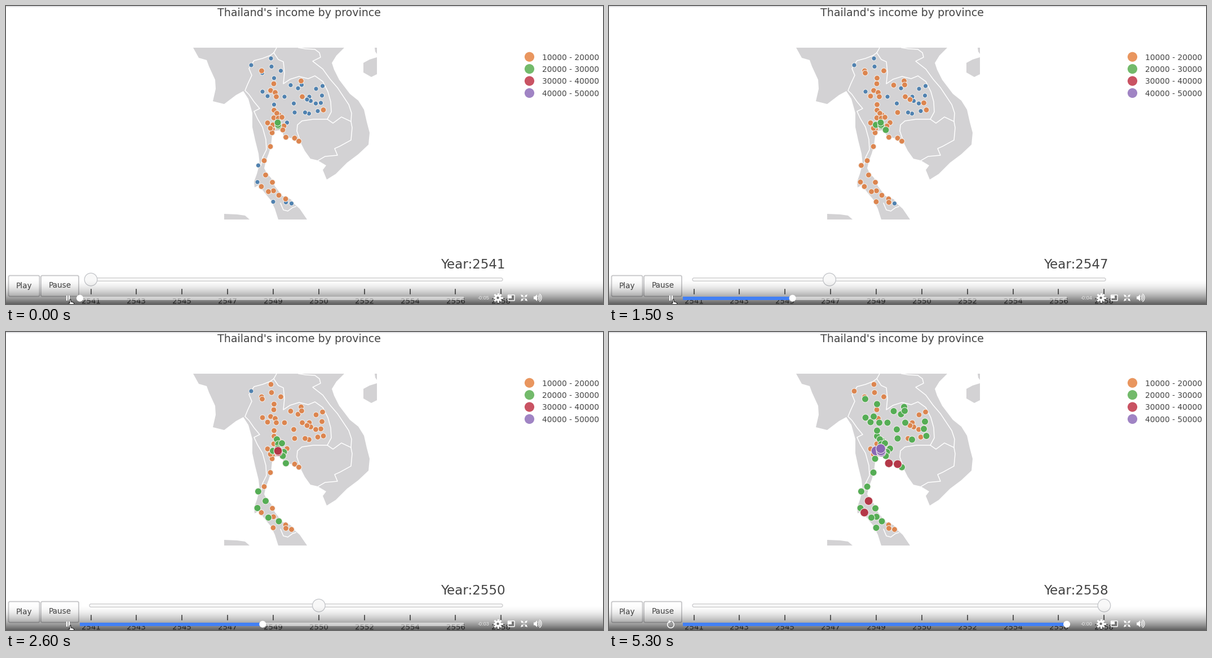
Animation of 1059x529 px, one loop 5.6 s. Source, as a matplotlib script:

```python
import numpy as np
import matplotlib.pyplot as plt
from matplotlib.animation import FuncAnimation
from matplotlib.patches import Circle, FancyBboxPatch, Polygon, Rectangle

W, H, DPI = 1059, 529, 100
STEP, LOOP = 100, 5600
PX = 72 / DPI  # points per pixel

YEARS = [2541, 2543, 2545, 2547, 2549, 2550, 2552, 2554, 2556, 2558]
LAND = "#d3d2d4"
INK = "#444444"

# income band: dot colour and radius
BANDS = {
    "b": ("#5082b0", 4.1),
    "o": ("#dc854f", 4.9),
    "g": ("#55ad55", 6.0),
    "r": ("#b43848", 7.4),
    "p": ("#8a68b4", 8.4),
}
LEGEND = [("10000 - 20000", "#e9965f"), ("20000 - 30000", "#73ba6b"),
          ("30000 - 40000", "#c95363"), ("40000 - 50000", "#a084c4")]

# provinces grouped by their income bands in 2541, 2545, 2547, 2549, 2550, 2558
PROVINCES = {
    "bbbbbo": [(435, 105)],
    "bbbooo": [(470, 93), (471, 107.5), (506.5, 350.5), (538, 161),
               (540.5, 168.5)],
    "bboooo": [(487.5, 115), (534, 166)],
    "oboooo": [(453.5, 115), (475, 138), (496, 342.5)],
    "boooog": [(454.5, 119), (475.5, 128), (464, 160), (498.5, 207),
               (474, 347.5)],
    "obooog": [(469.5, 150)],
    "oooooo": [(477.5, 153.5), (475, 198.5), (464, 207.5), (472.5, 218.5)],
    "ooooog": [(479.5, 161), (475.5, 185), (484, 193), (472, 225),
               (469, 249.5), (458, 274.5), (472.5, 313), (474.5, 328),
               (523.5, 133), (525.5, 161), (563, 184.5)],
    "bbboog": [(455, 152), (494, 161), (518, 146), (560.5, 159),
               (537.5, 191), (510.5, 173)],
    "bbooog": [(475.5, 175), (505, 140.5), (524.5, 140), (558.5, 172),
               (512, 189)],
    "oooogg": [(480.5, 190.5), (493, 213), (483, 199)],
    "oooggg": [(489.5, 197.5), (465.5, 329.5), (484, 336)],
    "oogrgp": [(473.5, 211)],
    "gggrrp": [(483, 213), (482.5, 211)],
    "gggggp": [(482, 207)],
    "ooogoo": [(469, 217)],
    "oogggg": [(491, 220)],
    "oooggr": [(496.5, 233), (460.5, 300)],
    "ooogor": [(512, 234.5)],
    "ooogog": [(519.5, 240)],
    "booogg": [(447.5, 283)],
    "booggg": [(446, 312.5)],
    "ooooor": [(453, 320.5)],
    "booooo": [(496.5, 348.5)],
    "bobooo": [(550, 147)],
    "bbbboo": [(561.5, 142), (549.5, 173), (553, 186.5), (530.5, 189)],
}
COLUMN = {0: 0, 1: 0, 2: 1, 3: 2, 4: 3, 5: 4, 9: 5}

MAINLAND = [
    (332, 74), (600, 74), (586, 88), (578, 101), (582, 113), (591, 131),
    (610, 156), (625, 168), (635, 184), (640, 206), (645, 225), (643, 246),
    (625, 263), (605, 278), (585, 298), (569, 308), (562, 291), (568, 283),
    (553, 274), (540, 271), (530, 257), (523, 243), (515, 237), (500, 233),
    (493, 232), (489, 220), (475, 222), (472, 230), (470, 248), (466, 262),
    (461, 275), (458, 288), (463, 298), (470, 305), (477, 320), (490, 337),
    (505, 343), (512, 352), (521, 360), (534, 379), (483, 379), (477, 360),
    (470, 345), (460, 333), (453, 324), (448, 318), (441, 322), (440, 312),
    (445, 298), (450, 280), (448, 262), (442, 238), (437, 215), (437, 190),
    (430, 165), (421, 151), (408, 158), (387, 174), (367, 169), (372, 147),
    (371, 131), (360, 107), (356, 96), (342, 92),
]
ISLANDS = [
    [(634, 101), (645, 95), (658, 91), (658, 121), (648, 126), (634, 118)],
    [(654, 74), (658, 74), (658, 85), (655, 81)],
    [(387, 369), (410, 370), (424, 372), (432, 379), (387, 379)],
]
BORDERS = [
    # west and north of the kingdom
    [(452, 283), (455, 269), (462, 255), (461, 237), (455, 215), (446, 200),
     (440, 187), (450, 182), (440, 170), (431, 157), (424, 150), (429, 138),
     (436, 123), (431, 111), (440, 97), (455, 93), (468, 88), (475, 83)],
    # east of the kingdom
    [(475, 83), (483, 95), (492, 99), (494, 118), (492, 138), (504, 130),
     (520, 125), (536, 129), (548, 124), (562, 134), (571, 152), (576, 170),
     (577, 188), (570, 201), (545, 201), (525, 204), (517, 211), (516, 222),
     (523, 243)],
    [(475, 83), (480, 74)],
    [(519, 74), (531, 76), (548, 77), (556, 83), (558, 91), (544, 98),
     (562, 112), (575, 130), (588, 145), (598, 160), (608, 175), (613, 190),
     (612, 205)],
    [(570, 201), (580, 208), (595, 197), (612, 205), (614, 216), (612, 238),
     (592, 249), (583, 253), (588, 265), (566, 267), (554, 274)],
    [(487, 350), (492, 362), (500, 364), (508, 358), (514, 356)],
]

# slider: moments at which each year takes over
SWITCHES = [(320, 1), (820, 2), (1337, 3), (1822, 4), (2330, 5), (4287, 9)]
GLIDE = 200
X0, DX = 150.5, 80.87

# video bar: quarter seconds played
TICK_TIMES = [0, 500, 700, 900, 1200, 1300, 1500, 1700, 1900, 2100, 2300,
              4400, 4600, 4800, 5000, 5300]
TICKS = [*range(11), 18, 19, 20, 20.7, 21]
BAR_L, BAR_R = 131, 812

fig = plt.figure(figsize=(W / DPI, H / DPI), dpi=DPI, facecolor="white")
ax = fig.add_axes([0, 0, 1, 1])
ax.set_xlim(0, W)
ax.set_ylim(H, 0)
ax.axis("off")


def add(patch, z):
    patch.set_zorder(z)
    return ax.add_patch(patch)


def disc(x, y, r, color, z, edge="none", lw=0):
    return add(Circle((x, y), r, fc=color, ec=edge, lw=lw * PX), z)


def rect(x, y, w, h, color, z, **kw):
    return add(Rectangle((x, y), w, h, fc=color, lw=0, **kw), z)


def rounded(x, y, w, h, r, color, edge, lw, z):
    style = f"round,pad=0,rounding_size={r}"
    return add(FancyBboxPatch((x, y), w, h, boxstyle=style, fc=color,
                              ec=edge, lw=lw * PX), z)


def line(points, color, lw, z):
    return ax.plot(*zip(*points), color=color, lw=lw * PX, zorder=z)[0]


def label(x, y, s, px, z=3, color=INK, ha="center", font="DejaVu Sans"):
    return ax.text(x, y, s, fontsize=px * PX, color=color, ha=ha,
                   va="baseline", family=font, zorder=z)


def draw_map():
    for shape in [MAINLAND, *ISLANDS]:
        add(Polygon(shape, fc=LAND, ec="none"), 1)
    for border in BORDERS:
        line(border, "white", 1.5, 2)


def draw_page():
    rect(0, 0, W, 1.8, "#e2e2e4", 1)
    label(519.5, 18, "Thailand's income by province", 19)
    for i, (name, color) in enumerate(LEGEND):
        y = 90.3 + 21.4 * i
        disc(928.5, y, 8.6, color, 3)
        label(951, y + 5.2, name, 13.9, ha="left")
    for x, w, name in [(4.5, 55, "Play"), (62, 67, "Pause")]:
        rounded(x, 478.5, w, 37, 2.5, "#fdfdfd", "#c6c6c8", 1.8, 3)
        label(x + w / 2, 500.5, name, 13.6, 4)
    rounded(148, 482.7, 733, 5.6, 2.8, "#f8f8f8", "#c9c9cb", 1.2, 3)
    for i, year in enumerate(YEARS):
        x = X0 + DX * i
        line([(x, 502.5), (x, 510.5)], INK, 1.6, 3)
        label(x, 527.5, str(year), 13.2)


def draw_shade():
    y = np.linspace(0, 1, 90)[:, None]
    shade = np.zeros((90, 1, 4))
    shade[..., 3] = 0.62 * y ** 1.8
    ax.imshow(shade, extent=(0, W, H, 484), aspect="auto", zorder=6,
              interpolation="bilinear")


def draw_controls():
    cx, cy = 872.5, 518
    for a in np.arange(8) * np.pi / 4:
        dx, dy = np.cos(a), np.sin(a)
        line([(cx + 3 * dx, cy + 3 * dy), (cx + 7 * dx, cy + 7 * dy)],
             "white", 3, 8)
    disc(cx, cy, 5.5, "white", 8)
    disc(cx, cy, 2.2, "#6e6e6e", 9)

    rounded(890.5, 513, 11.5, 10, 1, "#777777", "white", 1.5, 8)
    rect(891, 513.5, 6, 5, "white", 9)

    for sx in (-1, 1):
        for sy in (-1, 1):
            x, y = 919 + 5 * sx, 518 + 5 * sy
            add(Polygon([(x, y), (x - 4 * sx, y), (x, y - 4 * sy)],
                        fc="white", ec="none"), 8)
            line([(919 + 1.5 * sx, 518 + 1.5 * sy), (x, y)], "white", 1.5, 8)

    add(Polygon([(936, 515.5), (938.5, 515.5), (942, 512), (942, 524),
                 (938.5, 520.5), (936, 520.5)], fc="white", ec="none"), 8)
    a = np.linspace(-0.9, 0.9, 16)
    for r in (3.5, 6, 8.5):
        line(list(zip(941.5 + r * np.cos(a), 518 + r * np.sin(a))),
             "white", 1.2, 8)


def hand(x, y):
    outline = np.array([(0, 0), (2, 0), (2.3, 4), (6, 5), (7.5, 6), (7.5, 9),
                        (6, 12), (1, 12), (-2.5, 8), (-1.5, 6), (0, 7)])
    return add(Polygon(outline + (x, y), fc="white", ec="#111111",
                       lw=1 * PX), 12)


def replay_icon():
    a = np.linspace(-1.1, 4.3, 40)
    ring = line(list(zip(109.5 + 5.8 * np.cos(a), 519.5 + 5.8 * np.sin(a))),
                "white", 1.5, 10)
    tip = add(Polygon([(106, 511.5), (110.5, 514), (106.5, 517)],
                      fc="white", ec="none"), 10)
    return [ring, tip]


draw_map()
draw_page()
draw_shade()
draw_controls()

dots = ax.scatter([], [], zorder=4)
year_text = label(771, 465.5, "", 23, ha="left")
thumb = disc(X0, 485.5, 11.3, "#f8f8f8", 5, "#c4c6ca", 1.3)

rect(BAR_L, 516, BAR_R - BAR_L, 5.5, "white", 7, alpha=0.55)
played = rect(BAR_L, 516, 0, 5.5, "#4280f5", 8)
playhead = disc(BAR_L, 518.7, 6, "white", 9)
clock = label(837, 521.3, "", 9.2, 8, "#e6e6e6", "left", "Liberation Sans")

pause_icon = [rect(x, 514, 2, 9, "white", 10) for x in (106.5, 111)]
low_hand = hand(113, 521)
high_hand = hand(110.5, 512)
replay = replay_icon()


def ease(p):
    p = min(max(p, 0), 1)
    return 4 * p ** 3 if p < 0.5 else 1 - 4 * (1 - p) ** 3


def stall(t):
    """Freeze the two stretches where playback hangs."""
    if 2600 <= t < 4400:
        return 2600
    return 4400 if 4400 <= t < 4600 else t


def slider_state(t):
    index, x = 0, X0
    for start, i in SWITCHES:
        if t >= start:
            index = i
            x = X0 + DX * (i - 1 + ease((t - start) / GLIDE))
    return index, x


def show_dots(index):
    col = COLUMN[index]
    found = [(history[col], xy) for history, group in PROVINCES.items()
             for xy in group]
    order = list(BANDS)
    found.sort(key=lambda item: order.index(item[0]))
    dots.set_offsets([xy for _, xy in found])
    dots.set_sizes([(2 * BANDS[b][1] * PX) ** 2 for b, _ in found])
    dots.set_facecolor([BANDS[b][0] for b, _ in found])
    dots.set_edgecolor("#f4f1ee")
    dots.set_linewidth(1.0 * PX)


def update(frame):
    now = frame * STEP
    t = stall(now)
    index, x = slider_state(t)
    show_dots(index)
    year_text.set_text(f"Year:{YEARS[index]}")
    thumb.set_center((x, 485.5))

    ticks = TICKS[np.searchsorted(TICK_TIMES, t, side="right") - 1]
    head = BAR_L + (BAR_R - BAR_L) * ticks / 21
    played.set_width(head - BAR_L)
    playhead.set_center((head, 518.7))
    clock.set_text(f"-0:{int((21 - ticks) / 4 + 0.5):02d}")

    ended = now >= 5300
    for part in [*pause_icon, low_hand]:
        part.set_visible(now < 4400)
    high_hand.set_visible(now >= 4400 and not ended)
    for part in replay:
        part.set_visible(ended)
    return []


anim = FuncAnimation(fig, update, frames=LOOP // STEP, interval=STEP,
                     repeat=True, repeat_delay=0, blit=False)
plt.show()
```
